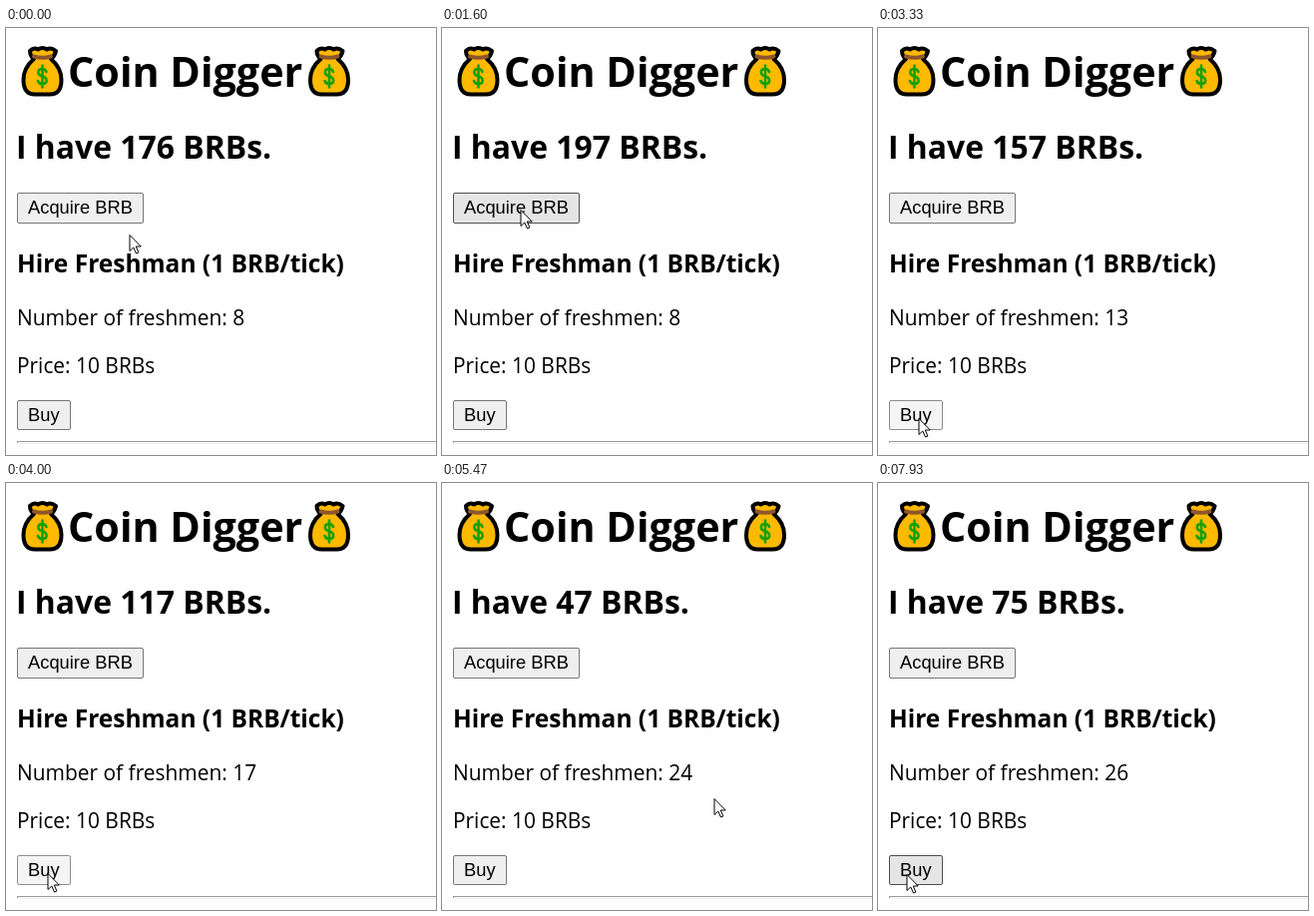
An HTML page for the animation above (8000 ms loop, 431x428 px).

```html
<!DOCTYPE html>
<html lang="en">
<head>
<meta charset="utf-8">
<title>Coin Digger</title>
<style>
  html, body { margin: 0; width: 100%; height: 100%; overflow: hidden; background: #fff; }
  svg { display: block; font: 20.9px "Open Sans", "Noto Sans", sans-serif; }
  .b { font-weight: 700; }
  .btn { font: 18.33px "Liberation Sans", Arial, sans-serif; }
  .btn rect { fill: #efefef; stroke: #767676; }
  .btn.hover rect { fill: #e5e5e5; stroke: #4f4f4f; }
  .btn.down rect { fill: #f5f5f5; stroke: #8d8d8d; }
</style>
</head>
<body>
<svg width="431" height="428" viewBox="0 0 431 428">
  <defs>
    <g id="bag" fill="none" stroke-linecap="round" stroke-linejoin="round">
      <path fill="#ffb900" stroke="#000" stroke-width="4" d="M24 23Q28 19 32 21.5Q36.5 18.5 41 21.5Q45 19 50 23Q49 28 45 31Q55.5 40 55.5 52Q55.5 66.5 44 66.5H29Q17.5 66.5 17.5 52Q17.5 40 28 31Q24 28 24 23Z"/>
      <path stroke="#8e562e" stroke-width="4" d="M28 28.5Q36.5 31 45 28.5"/>
      <path stroke="#13a10e" stroke-width="2.6" d="M40.5 44Q39.5 41 36.5 41C31 41 31 47 36.5 48.3C42 50 42 56 36.5 56Q33 56 32 53M36.5 37.5V59.5"/>
    </g>
  </defs>
  <use href="#bag"/>
  <text class="b" x="62" y="58.5" font-size="41.3">Coin Digger</text>
  <use href="#bag" x="287.5"/>
  <text class="b" x="10" y="131" font-size="31.9" id="money"></text>
  <g class="btn" id="acquire">
    <rect x="11.5" y="165.5" width="126" height="30" rx="1.5"/>
    <text x="22" y="186">Acquire BRB</text>
  </g>
  <text class="b" x="11" y="245" font-size="24.5">Hire Freshman (1 BRB/tick)</text>
  <text x="11" y="297.5" id="staff"></text>
  <text x="11" y="345.5">Price: 10 BRBs</text>
  <g class="btn" id="buy">
    <rect x="11.5" y="373.5" width="53" height="29" rx="1.5"/>
    <text x="22" y="394">Buy</text>
  </g>
  <path fill="#9a9a9a" d="M11 414H431V415H12V416H11Z"/>
  <path fill="#eee" d="M12 416H431V417H12Z"/>
  <path id="cursor" fill="#fff" stroke="#000" d="M0 .5V16.5L3.8 13 6.5 19 8.9 18 6.3 12H11.3Z"/>
</svg>
<script>
const STEPS = 120, STEP_MS = 8000 / STEPS;
const TICK = 15, LAST_HIRE = 76;
const $ = id => document.getElementById(id);

// Mouse path: step, x, y
const path = [
  [0, 124, 207], [7, 79, 182], [29, 79, 182], [33, 46, 375], [36, 41, 391],
  [LAST_HIRE, 42, 391], [81, 273, 316], [108, 277, 315], [115, 29, 392], [STEPS, 29, 392]
];

function mouseAt(step) {
  const i = path.findIndex(p => p[0] > step);
  const [s0, x0, y0] = path[i - 1], [s1, x1, y1] = path[i];
  const u = (step - s0) / (s1 - s0), e = u * u * (3 - 2 * u);
  return [Math.round(x0 + (x1 - x0) * e), Math.round(y0 + (y1 - y0) * e)];
}

// Presses and releases so far in a steady run of clicks
const burst = (elapsed, clicks) =>
  Math.max(0, Math.min(2 * clicks, Math.floor(elapsed * 0.8 + 0.6)));

function updateButton(id, events, [x, y]) {
  const box = $(id).firstElementChild.getBBox();
  const over = x >= box.x && y >= box.y && x <= box.x + box.width && y <= box.y + box.height;
  $(id).setAttribute("class", "btn" + (events % 2 ? " down" : over ? " hover" : ""));
  return events >> 1;
}

// Each freshman pays once per tick; hiring restarts the timer
function income(step) {
  const before = Math.floor((Math.min(step, 37) + 13) / TICK);
  const after = Math.floor(Math.max(0, step - LAST_HIRE) / TICK);
  return 8 * before + 24 * after;
}

function draw(now) {
  const step = Math.floor(now / STEP_MS + 0.1) % STEPS;
  const mouse = mouseAt(step);
  const clicks = updateButton("acquire", burst(step - 12, 7), mouse);
  const hires = updateButton("buy", burst(step - 36, 16) + burst(step - 114, 2), mouse);
  $("money").textContent = `I have ${176 + income(step) + clicks - 10 * hires} BRBs.`;
  $("staff").textContent = `Number of freshmen: ${8 + hires}`;
  $("cursor").setAttribute("transform", `translate(${mouse})`);
}

const start = performance.now();
function loop() {
  draw(performance.now() - start);
  requestAnimationFrame(loop);
}
loop();
</script>
</body>
</html>
```
